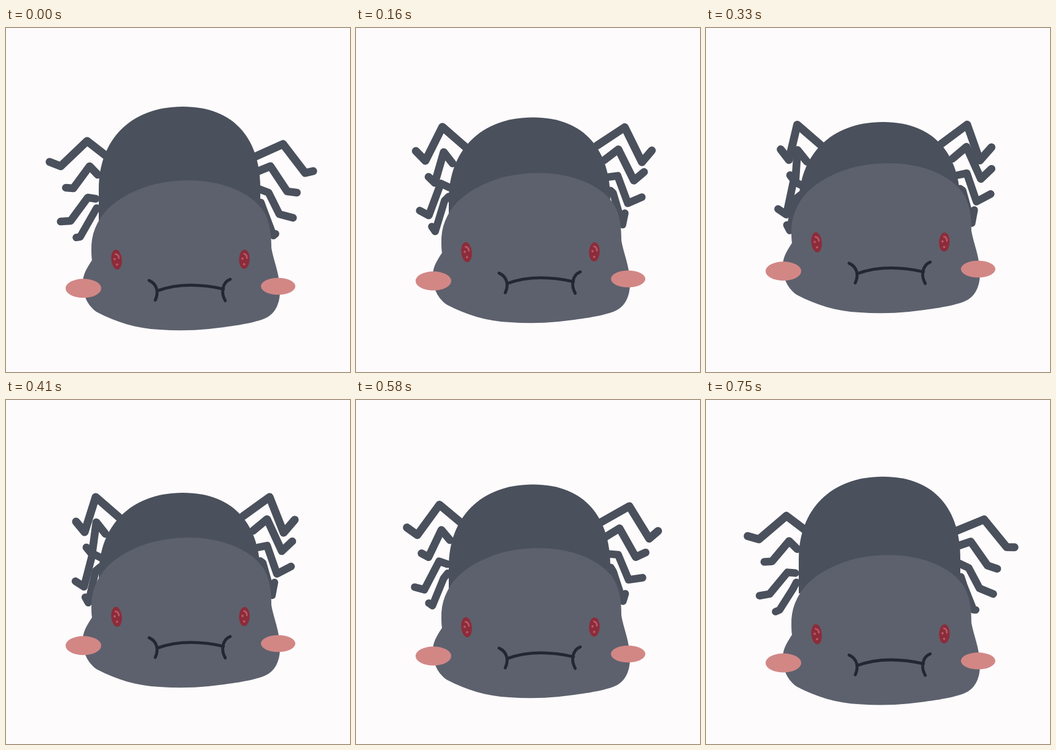
An HTML page with a canvas that plays this animation: 560x560 px, repeating every 830 ms.

```html
<!DOCTYPE html>
<html lang="en">
<head>
<meta charset="utf-8">
<title>Bouncing spider</title>
<style>
  html, body { margin: 0; width: 100%; height: 100%; overflow: hidden; background: #fdfbfc; }
  canvas { display: block; }
</style>
</head>
<body>
<canvas id="stage" width="560" height="560"></canvas>
<script>
const ctx = document.getElementById('stage').getContext('2d');
const LOOP = 830;
const PAPER = '#fdfbfc', SHELL = '#4a505c', FACE = '#5d616d', BLUSH = '#d28785';
const EYE = '#8c2c3a', GLINT = '#b9596a', INK = '#232633';

// unfold: 0 crouching, 1 standing. head: vertical shift of the face.
const stretch = { unfold: 1.1, head: 4.3 };
const stand = { unfold: 1, head: 0 };
const dip = { unfold: 0.65, head: -7 };
const squat = { unfold: 0.28, head: -12 };
const crouch = { unfold: 0, head: -24 };
const lowest = { unfold: -0.1, head: -28 };

const timeline = [
  [0, stand], [80, dip], [160, squat], [250, crouch], [330, lowest],
  [410, crouch], [500, squat], [580, dip], [660, stand], [750, stretch]
];

// Crouching legs from top to bottom, each as hip, knee, ankle, toe.
// reach and lift say how far each joint travels out and down when unfolding.
const sides = [
  {
    out: -1,
    reach: [16, 14, 39, 43],
    lift: [21, 26, 10, 20],
    fade: tier => 1 - 0.22 * tier,
    legs: [
      [[184, 191], [146, 158], [128, 215], [114, 198]],
      [[162, 218], [147, 199], [140, 251], [131, 240]],
      [[155, 257], [141, 250], [127, 304], [113, 295]],
      [[153, 272], [146, 278], [134, 330], [129, 321]]
    ]
  },
  {
    out: 1,
    reach: [16, 22, 35, 30],
    lift: [22, 31, 20, 38],
    fade: tier => 1 / (tier + 1) ** 2,
    legs: [
      [[386, 189], [429, 158], [452, 216], [470, 195]],
      [[402, 213], [425, 194], [449, 246], [466, 230]],
      [[410, 240], [425, 237], [441, 283], [464, 271]],
      [[414, 262], [418, 265], [433, 318], [437, 297]]
    ]
  }
];

const bodyPath = new Path2D('M151 262C151 182 203 128 288 128C373 128 414 182 414 262V318H151Z');
const headPath = new Path2D(
  'M297 248C249 248 201 262 166 294C147 314 138 337 139 362Q139 372 140 378' +
  'C131 392 124 402 125 420C126 439 136 455 149 463C180 479 211 489 250 491' +
  'Q290 494 330 490C364 486 398 482 421 473C438 466 446 449 446 428' +
  'C446 401 435 377 432 358C432 337 430 318 421 301C399 265 347 248 297 248Z');
const mouthPath = new Path2D(
  'M246 428Q292 411 354 425M233 411C246 417 249 430 243 443M365 409C351 415 350 432 357 444');

const signedPow = (v, p) => Math.sign(v) * Math.abs(v) ** p;

function ellipse(x, y, rx, ry, color) {
  ctx.fillStyle = color;
  ctx.beginPath();
  ctx.ellipse(x, y, rx, ry, 0, 0, Math.PI * 2);
  ctx.fill();
}

// Joints swing outward early and sink late, so they travel on an arc.
function drawLegs(side, unfold) {
  const outward = side.out * signedPow(unfold, 0.75);
  const down = signedPow(unfold, 1.7);
  ctx.strokeStyle = SHELL;
  side.legs.forEach((joints, tier) => {
    ctx.lineWidth = 13 - 0.3 * tier;
    ctx.beginPath();
    joints.forEach(([x, y], j) => ctx.lineTo(
      x + outward * side.reach[j] * side.fade(tier),
      y + down * side.lift[j]));
    ctx.stroke();
  });
}

function drawEye(x, y, ry, turn) {
  ctx.save();
  ctx.translate(x, y);
  ctx.rotate(turn);
  ellipse(0, 0, 8.7, ry, EYE);
  ctx.strokeStyle = GLINT;
  ctx.lineWidth = 2.6;
  ctx.beginPath();
  ctx.moveTo(-1, -9);
  ctx.quadraticCurveTo(4, -8, 4, -2);
  ctx.stroke();
  ellipse(-3, -1, 1.8, 2, GLINT);
  ellipse(0, 8, 2, 1.7, GLINT);
  ctx.restore();
}

function drawBody() {
  ctx.fillStyle = SHELL;
  ctx.fill(bodyPath);
}

function drawHead() {
  ctx.fillStyle = FACE;
  ctx.fill(headPath);
  ellipse(126, 423.7, 29, 15.5, BLUSH);
  ellipse(443, 420.5, 28, 13.7, BLUSH);
  drawEye(180, 377, 16.3, -0.1);
  drawEye(388, 376.5, 15.5, 0.04);
  ctx.strokeStyle = INK;
  ctx.lineWidth = 4.8;
  ctx.stroke(mouthPath);
}

function shifted(dy, draw) {
  ctx.save();
  ctx.translate(0, dy);
  draw();
  ctx.restore();
}

function drawPose({ unfold, head }) {
  ctx.fillStyle = PAPER;
  ctx.fillRect(0, 0, 560, 560);
  ctx.lineCap = ctx.lineJoin = 'round';
  sides.forEach(side => drawLegs(side, unfold));
  shifted(23 * signedPow(1 - unfold, 0.85), drawBody);
  shifted(head, drawHead);
}

const start = performance.now();
function tick() {
  const t = (performance.now() - start) % LOOP;
  drawPose(timeline.findLast(([from]) => from <= t)[1]);
  requestAnimationFrame(tick);
}
tick();
</script>
</body>
</html>
```
